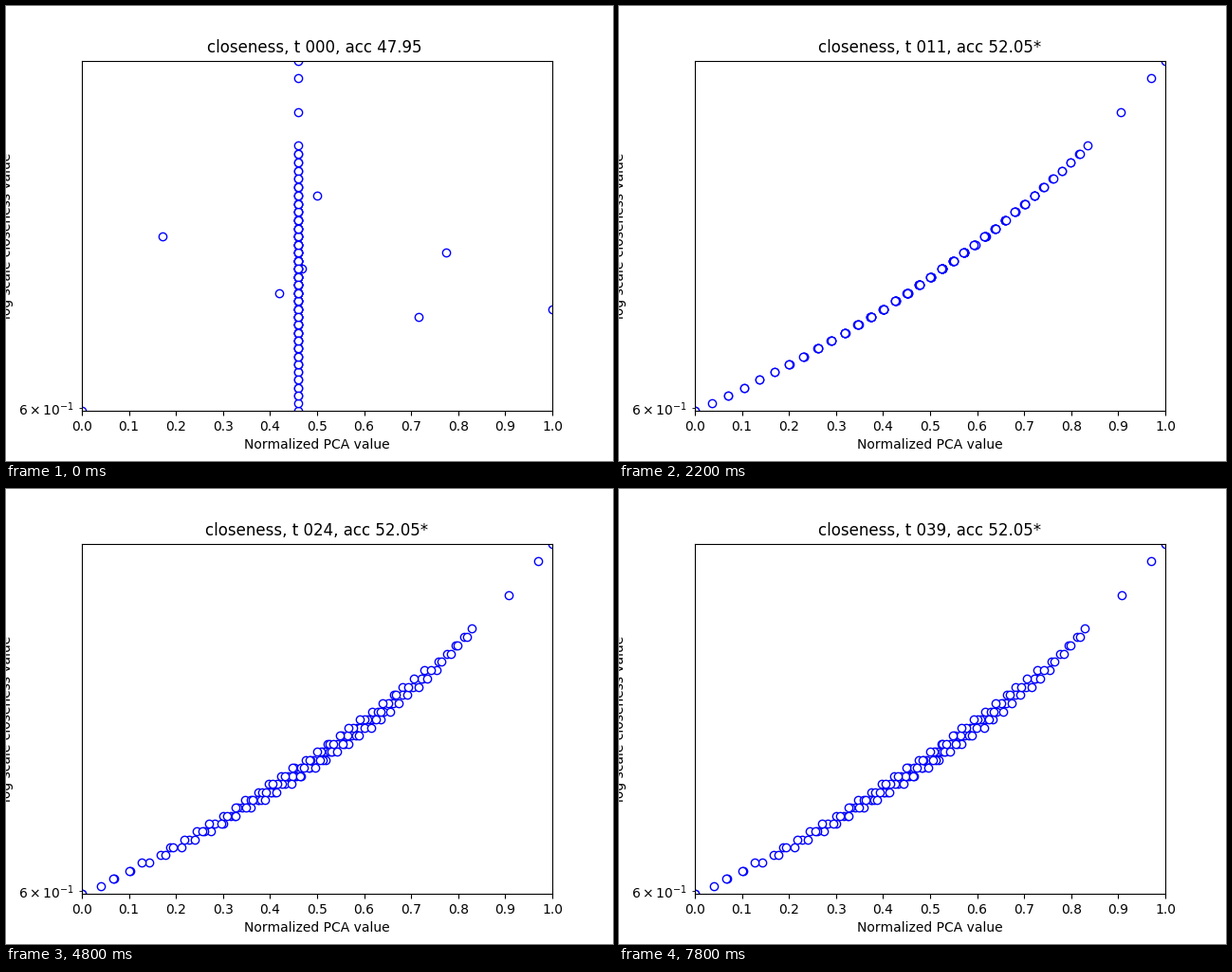
These frames come from a looping animation (640x480 px, 8000 ms). A matplotlib script:

```python
import numpy as np
import matplotlib.pyplot as plt
from matplotlib.animation import FuncAnimation

FRAMES, INTERVAL = 40, 200
NODES, NEAREST = 247, 369      # closeness = NODES / (NEAREST + step)
START = 0.46                   # value shared by nearly all nodes at first

# Nodes that start elsewhere: step -> first value
STRAYS = {16: 0.5, 21: 0.172, 23: 0.774, 25: 0.468,
          28: 0.42, 30: 1.0, 31: 0.716, 43: 0.0}

# Width of the cloud around its limit curve, as key points in time
SPREAD_T = [1, 7, 11, 20, 28, 39]
SPREAD = [1.2, 0.4, 0.05, 0.45, 1.0, 0.71]

rng = np.random.default_rng(4)


def bell(s, width):
    return np.exp(-((s - 26) / width) ** 2)


def row(s):
    """Nodes of one step: more of them, and wider apart, in the middle."""
    n = 1 + round(6 * bell(s, 10))
    u = (np.arange(n) + rng.random(n)) / n
    return np.full(n, s), (-0.046 + 0.076 * u) * bell(s, 14)


steps, offsets = zip(*(row(s) for s in [0, 2, 6, *range(10, 44)]))
step = np.concatenate([*steps, list(STRAYS)])
offset = np.concatenate([*offsets, np.zeros(len(STRAYS))])
start = np.full(len(step), START)
start[-len(STRAYS):] = list(STRAYS.values())

curve = np.polyfit([0, 10, 21, 32, 43], [1, 0.836, 0.617, 0.347, 0], 4)
limit = np.polyval(curve, step)
closeness = NODES / (NEAREST + step)
order = rng.permutation(len(step))


def positions(t):
    if t == 0:
        return start
    return np.clip(limit + offset * np.interp(t, SPREAD_T, SPREAD), 0, 1)


plt.rcParams["text.kerning_factor"] = 6
fig, ax = plt.subplots(figsize=(6.4, 4.8), dpi=100)
ax.set_yscale("log")
ax.set_xlim(0, 1)
ax.set_ylim(closeness.min(), closeness.max())
ax.set_xticks(np.linspace(0, 1, 11))
ax.set_yticks([0.6], minor=True)
ax.set_xlabel("Normalized PCA value")
ax.set_ylabel("log scale closeness value")
title = ax.set_title("")
dots, = ax.plot([], [], "o", mec="b", mfc="white")


def draw(t):
    dots.set_data(positions(t)[order], closeness[order])
    acc = "52.05*" if t else "47.95 "
    title.set_text(f"closeness, t {t:03d}, acc {acc}")
    return dots, title


anim = FuncAnimation(fig, draw, frames=FRAMES, interval=INTERVAL,
                     repeat=True, repeat_delay=0)
plt.show()
```
